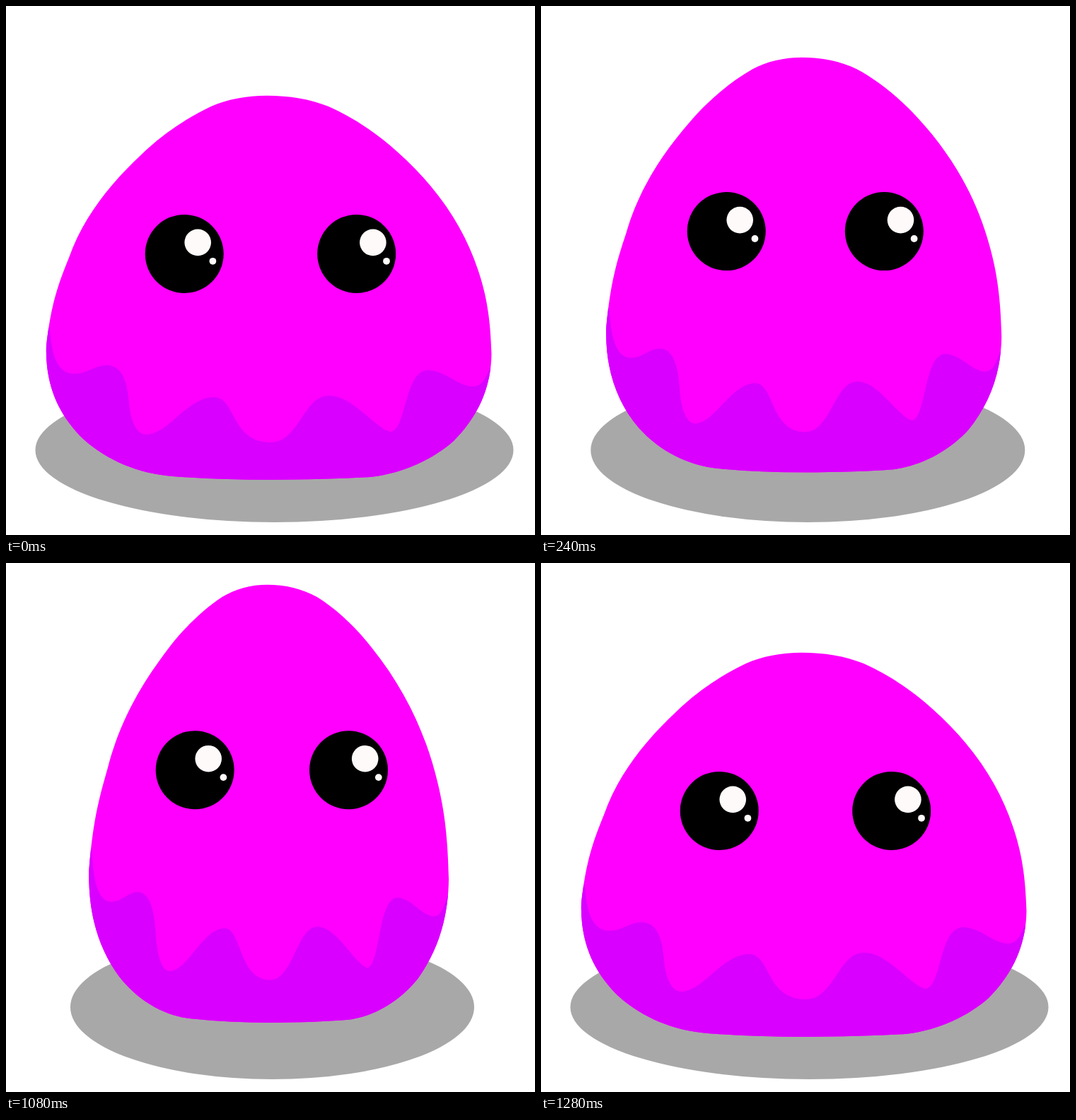
Recreate the animation shown at these times as an HTML page. Size 748 by 748 pixels, loop 2 s.

```html
<!DOCTYPE html>
<html lang="en">
<head>
<meta charset="utf-8">
<title>Bouncing blob</title>
<style>
  html, body { margin: 0; width: 100%; height: 100%; overflow: hidden; background: #fff; }
  svg { display: block; width: 100vw; height: 100vh; }
</style>
</head>
<body>
<svg viewBox="0 0 748 748">
  <defs>
    <path id="outline" d="M369 126.7 C340 126.7 312 132 290 142 C258 157 227 178 200 202
      C160 239 113 288 89 356 C74 393 64 420 57 480 C55 535 74 578 109 612
      C143 643 188 661 235 665 Q304 670 372 670 Q455 669.5 515 666
      C562 661 605 640 633 615 C667 581 686 540 686.5 492 C685 443 680 410 667 372
      C648 315 612 258 552 205 C523 179 490 157 456 142 C430 131.5 400 126.7 369 126.7Z"/>
    <clipPath id="inside"><use href="#outline"/></clipPath>
    <g id="eye">
      <circle r="55.5"/>
      <circle cx="19" cy="-16" r="18.8" fill="snow"/>
      <circle cx="40.2" cy="10.4" r="4.9" fill="snow"/>
    </g>
  </defs>
  <ellipse id="shadow" cy="628" ry="102" fill="#a8a8a8"/>
  <g id="body">
    <use href="#outline" fill="#f0f"/>
    <path clip-path="url(#inside)" fill="#d900ff" d="M62 455 C64 500 76 520 96 520
      C116 520 125 508 142 508 C168 508 172 540 174 562 C176 585 184 606 198 606
      C230 606 255 554 294 553 C325 553 318 617 374 617 C415 617 420 551 457 551
      C490 551 520 595 543 602 C567 602 562 515 597 515 C620 515 640 538 660 538
      C672 538 678 528 684 512 L748 512 V748 H0 V455Z"/>
  </g>
  <use id="leftEye" href="#eye"/>
  <g id="rightEye">
    <circle r="55.5"/>
    <circle cx="23.2" cy="-16" r="18.8" fill="snow"/>
    <circle cx="42.3" cy="10.4" r="4.9" fill="snow"/>
  </g>
</svg>
<script>
  const LOOP = 2000, STEP = 40;

  // Poses from resting to fully stretched.
  const poses = [
    { sx: 1,     sy: 1,     lift: 0,    eyeLift: 0,    rightShift: 0,    shadowX: 379.5, shadowR: 338 },
    { sx: .9635, sy: 1.023, lift: 1.5,  eyeLift: 7.5,  rightShift: 8.8,  shadowX: 378.3, shadowR: 327.8 },
    { sx: .888,  sy: 1.08,  lift: 10.5, eyeLift: 31.8, rightShift: 10.4, shadowX: 377.3, shadowR: 307 },
    { sx: .808,  sy: 1.14,  lift: 20,   eyeLift: 57.7, rightShift: 11.2, shadowX: 376.5, shadowR: 285.5 },
    { sx: .76,   sy: 1.169, lift: 23,   eyeLift: 69,   rightShift: 11.5, shadowX: 376.2, shadowR: 273 }
  ];

  const part = id => document.getElementById(id);
  const [shadow, body, leftEye, rightEye] = ["shadow", "body", "leftEye", "rightEye"].map(part);
  const place = (element, x, y) => element.setAttribute("transform", `translate(${x} ${y})`);

  function draw(time) {
    const step = Math.floor(time % LOOP / STEP);
    // Two hops per loop, peaking at steps 4 and 28.
    const level = Math.max(0, 4 - Math.abs(step - 4), 4 - Math.abs(step - 28));
    const pose = poses[level];

    shadow.setAttribute("cx", pose.shadowX);
    shadow.setAttribute("rx", pose.shadowR);
    body.setAttribute("transform",
      `translate(371.5 ${670 - pose.lift}) scale(${pose.sx} ${pose.sy}) translate(-371.5 -670)`);
    place(leftEye, 252.2 + 5 * level, 350.4 - pose.eyeLift);
    place(rightEye, 495.7 - pose.rightShift, 350.4 - pose.eyeLift);
  }

  const start = performance.now();
  function tick() {
    draw(performance.now() - start);
    requestAnimationFrame(tick);
  }
  tick();
</script>
</body>
</html>
```
